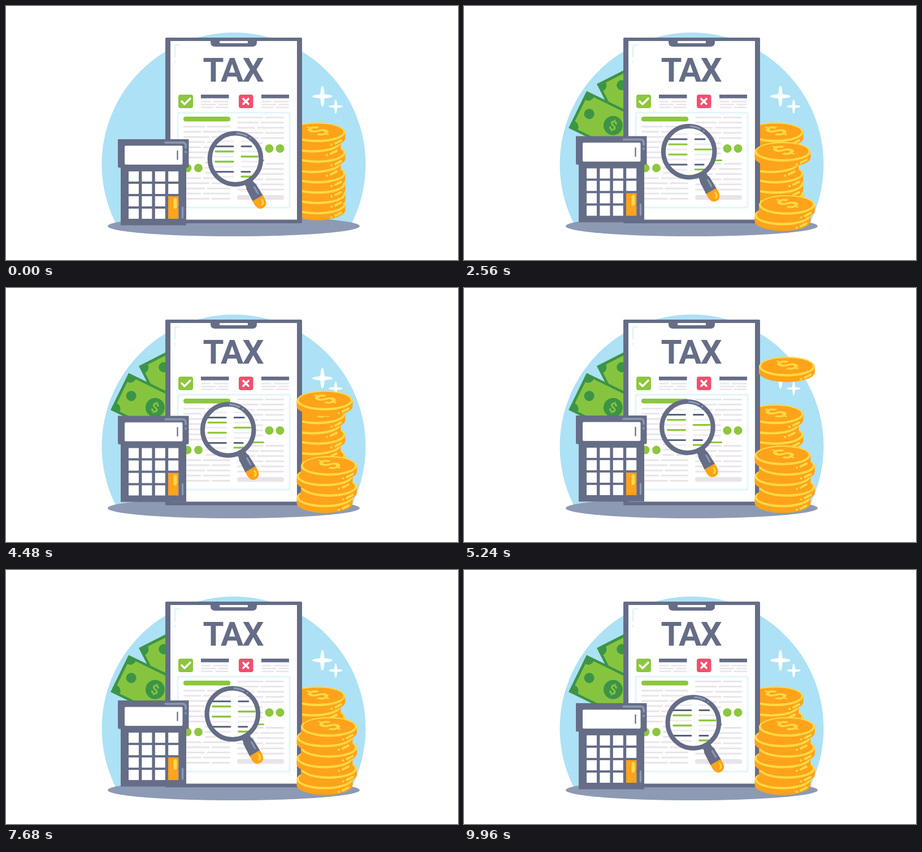
An HTML page for the animation above (10 s loop, 800 by 450 pixels).

```html
<!DOCTYPE html>
<html lang="en">
<head>
<meta charset="utf-8">
<title>Tax</title>
<style>
html, body { margin: 0; width: 100%; height: 100%; overflow: hidden; background: #fff; }
svg { display: block; width: 800px; height: 450px; }
text { font-family: Roboto, sans-serif; font-weight: 700; }
.line { fill: none; stroke-linecap: round; stroke-linejoin: round; }
#calc { animation: lift 10s linear infinite; }
@keyframes lift { 50% { transform: translateY(-10.6px); } }
</style>
</head>
<body>
<svg viewBox="0 0 800 450">
  <defs>
    <clipPath id="sky"><rect x="160" y="40" width="490" height="345"/></clipPath>
    <clipPath id="glass"><circle r="43"/></clipPath>
    <g id="star" fill="#fff">
      <ellipse rx="3.700" ry="18.500"/>
      <ellipse rx="18" ry="3.700"/>
      <circle r="4.500"/>
    </g>
    <g id="coin">
      <path d="M-49.500 17.500V27.500A49.500 17.500 0 0 0 49.500 27.500V17.500Z" fill="#ffa31a"/>
      <ellipse cy="17.500" rx="49.500" ry="17.500" fill="#ffd944"/>
      <ellipse cy="16.500" rx="46" ry="14.300" fill="#ffa31a"/>
      <text transform="translate(1 15) scale(1 .46) rotate(-52)" y="19" font-size="53" text-anchor="middle" fill="#ffd944">$</text>
      <path class="line" d="M32 37L42 32M25 39.500h.1" stroke="#ffd944" stroke-width="4"/>
    </g>
    <g id="bill">
      <rect width="138" height="73" rx="1" fill="#3c9446"/>
      <path d="M16 4.500H122A11 11 0 0 0 133 15.500V57.500A11 11 0 0 0 122 68.500H16A11 11 0 0 0 5 57.500V15.500A11 11 0 0 0 16 4.500Z" fill="#86c440"/>
      <circle cx="22" cy="34.500" r="9" fill="#3c9446"/>
      <circle cx="116" cy="34.500" r="9" fill="#3c9446"/>
      <circle cx="69" cy="34.500" r="17" fill="#3c9446"/>
      <text transform="translate(69 34.500) rotate(-8)" y="8.500" font-size="24" text-anchor="middle" fill="#86c440">$</text>
    </g>
  </defs>

  <circle cx="403" cy="280.500" r="233.500" fill="#ade1f5" clip-path="url(#sky)"/>
  <ellipse cx="403" cy="390" rx="223" ry="18" fill="#8d9ab4"/>
  <use href="#star" x="560" y="160"/>
  <use href="#star" transform="translate(583.500 178) scale(.68)"/>
  <g id="pile"></g>
  <g transform="translate(300 105) rotate(63)"><use id="backBill" href="#bill"/></g>
  <g transform="translate(217 150.500) rotate(26)"><use id="frontBill" href="#bill"/></g>

  <g id="board">
    <rect x="282" y="56" width="242" height="329" rx="2" fill="#656d87"/>
    <rect x="291" y="62" width="224" height="316.500" fill="#fff"/>
    <path d="M362 60H444V64Q444 72 436 72H370Q362 72 362 64Z" fill="#656d87"/>
    <rect x="378" y="62" width="50" height="4" rx="1" fill="#fff"/>
    <path class="line" d="M307 69H302Q299 69 299 72V90M299 98V100" stroke="#e2f5fb" stroke-width="3"/>
    <text x="401.500" y="133.500" font-size="60" letter-spacing="-2" text-anchor="middle" fill="#656d87">TAX</text>
    <rect x="305" y="157" width="26" height="24" rx="4" fill="#8dc63f"/>
    <path class="line" d="M311 169L316 174L326 164" stroke="#fff" stroke-width="3.600"/>
    <rect x="412" y="157" width="25.500" height="24" rx="4" fill="#f0506e"/>
    <path class="line" d="M420 164.500L429 173.500M429 164.500L420 173.500" stroke="#fff" stroke-width="3.600"/>
    <path d="M345 157h49.500v6.500h-49.500zM452 157h49v6.500h-49z" fill="#656d87"/>
    <rect x="304" y="189" width="198" height="168" rx="2" fill="none" stroke="#e2f5fb" stroke-width="3"/>
    <path id="copy" class="line" stroke="#e9e4ea" stroke-width="3"/>
    <path id="notes" class="line" stroke="#e9e4ea" stroke-width="2.400"/>
    <rect x="314" y="196" width="83" height="8.500" rx="4" fill="#8dc63f"/>
    <rect x="409" y="335" width="83" height="8.500" rx="4" fill="#e9e4ea"/>
    <path class="line" d="M411 273.500H455.500" stroke="#8dc63f" stroke-width="3"/>
    <g fill="#8dc63f">
      <circle cx="466" cy="252.500" r="7.500"/><circle cx="485" cy="252.500" r="7.500"/>
      <circle cx="321" cy="287" r="7.500"/><circle cx="340.500" cy="287" r="7.500"/>
    </g>
  </g>

  <g id="calc">
    <path d="M203 280H319V388.500H203Z" fill="#656d87"/>
    <path d="M198 236H323.500V284Q323.500 286.500 321 286.500H201Q198 286.500 198 284Z" fill="#656d87"/>
    <rect x="210" y="247.500" width="102.500" height="33.500" rx="2" fill="#fff"/>
    <path d="M303.500 256V272.500" stroke="#656d87" stroke-width="2.200"/>
    <path class="line" d="M282 242H313Q318 242 318 247V251M318 258V259" stroke="#8d9ab4" stroke-width="3.400"/>
    <path id="keys" fill="#fff"/>
    <rect x="287" y="337" width="18" height="40" rx="1" fill="#ffa31a"/>
    <path class="line" d="M299.500 343V356" stroke="#ffd944" stroke-width="6"/>
    <path class="line" d="M312.500 357V375" stroke="#8d9ab4" stroke-width="3.400"/>
  </g>

  <g id="lens">
    <g transform="rotate(60.500)">
      <path d="M46-8H53L56-9.500L81-10.500V10.500L56 9.500L53 8H46Z" fill="#656d87"/>
      <path d="M80-10.500H89Q100-9 100 0Q100 9 89 10.500H80Z" fill="#ffa31a"/>
      <path class="line" d="M60-4.500H73" stroke="#8d9ab4" stroke-width="3"/>
      <path class="line" d="M86-5H90Q94-4 94-1" stroke="#ffd944" stroke-width="3"/>
    </g>
    <circle r="43" fill="#fff"/>
    <g clip-path="url(#glass)">
      <path class="line" d="M-34-31H-4M11-31H34M11-13H40M-40-4H-4M11 5H40M-40 14H-4M11 14H40M-30 32H-4" stroke="#f0ecf0" stroke-width="3"/>
      <path class="line" d="M-35-22H-4M11-22H28M-35 23H-4M11 23H26" stroke="#56607f" stroke-width="3"/>
      <path class="line" d="M-35-13H-4M11-4H39M-35 5H-4M11 31.500H28" stroke="#8dc63f" stroke-width="3.400"/>
    </g>
    <circle r="45.300" fill="none" stroke="#656d87" stroke-width="8"/>
    <path class="line" d="M3-45.200A45.300 45.300 0 0 1 20-40.600M26-37l.5.300" stroke="#8d9ab4" stroke-width="3"/>
  </g>
  <g id="stack"></g>
</svg>
<script>
const $ = id => document.getElementById(id);

function addCoin(parent, x, y) {
  const coin = document.createElementNS('http://www.w3.org/2000/svg', 'use');
  coin.setAttribute('href', '#coin');
  coin.setAttribute('x', x);
  coin.setAttribute('y', y);
  parent.append(coin);
  return coin;
}

// A text row of two dashes with a gap at a varying place.
function row(x0, x1, y, k) {
  const gap = x0 + (x1 - x0) * [0.4, 0.58, 0.48][k % 3];
  return `M${x0 + 1.5} ${y}H${gap - 3}M${gap + 3} ${y}H${x1 - 1.5}`;
}

let copy = '', notes = '', keys = '';
for (let k = 0; k < 17; k++) {
  const y = 197.5 + k * 9.12;
  if (k > 1) copy += row(k > 8 && k < 12 ? 352 : 314, 397, y - 2, k);
  if (k < 15 && k !== 8) copy += row(409, k > 4 && k < 8 ? 455 : 492, y, k + 1);
}
for (let k = 0; k < 3; k++)
  for (const x of [345, 452]) notes += row(x, x + 49, 169.5 + k * 5, k);
for (let r = 0; r < 4; r++)
  for (let c = 0; c < 4; c++)
    keys += `M${217 + c * 23.4} ${293 + r * 22}h18v18h-18z`;
$('copy').setAttribute('d', copy);
$('notes').setAttribute('d', notes);
$('keys').setAttribute('d', keys);

[551, 551, 551, 551, 543, 551, 543, 551].forEach((x, i) => addCoin($('pile'), x, 334.4 - i * 18.3));

const coins = Array.from({ length: 6 }, (_, i) =>
  addCoin($('stack'), i % 2 ? 571.5 : 564, 353.5 - i * 18.6));

// Rows of [time in s, values...], joined by straight segments.
function along(track, t) {
  let i = 1;
  while (i < track.length - 1 && track[i][0] < t) i++;
  const a = track[i - 1], b = track[i];
  const p = Math.min(1, Math.max(0, (t - a[0]) / (b[0] - a[0])));
  return a.slice(1).map((v, k) => v + (b[k + 1] - v) * p);
}

const lensPath = [
  [0, 406, 270.7], [1.44, 409, 258.5], [2, 406, 256.3], [3, 392, 259.5], [3.64, 390.7, 256.7],
  [5.24, 395.4, 246.6], [6, 398.6, 242.3], [6.52, 400.2, 246], [8.3, 401.2, 259.5],
  [8.92, 402.1, 264.6], [10, 406, 270.7]
];
const fall = [[0, -186], [0.24, -138.8], [0.44, -108], [0.64, -54], [0.9, 0]];
const slideFront = [[1, 152], [2, 0]];
const slideBack = [[1, 136], [2.24, 0]];

function draw(t) {
  $('lens').setAttribute('transform', `translate(${along(lensPath, t)})`);
  coins.forEach((coin, i) => {
    coin.style.display = t > i ? '' : 'none';
    coin.setAttribute('transform', `translate(0 ${along(fall, t - i)})`);
  });
  for (const [id, track] of [['frontBill', slideFront], ['backBill', slideBack]]) {
    $(id).style.display = t > 1 ? '' : 'none';
    $(id).setAttribute('x', along(track, t)[0]);
  }
}

let start;
function tick(now) {
  start ??= now;
  draw((now - start) / 1000 % 10);
  requestAnimationFrame(tick);
}
draw(0);
requestAnimationFrame(tick);
</script>
</body>
</html>
```
